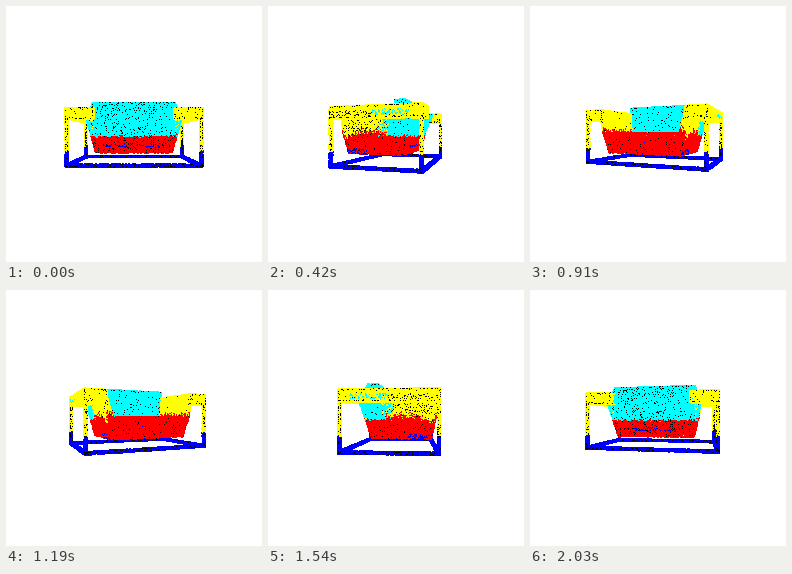
An HTML page with a canvas that plays this animation: 256 px wide and 256 px high, repeating every 2.1 s.

```html
<!DOCTYPE html>
<html>
<head>
<meta charset="utf-8">
<style>
html, body { margin: 0; height: 100%; overflow: hidden; background: #fff; }
canvas { display: block; width: 256px; height: 256px; }
</style>
</head>
<body>
<canvas id="stage" width="256" height="256"></canvas>
<script>
const SIZE = 256, MID = 128, STEP = 70, STEPS = 30;
const CAM = MID / Math.tan(Math.PI / 6);
// Packed as ABGR
const YELLOW = 0xff00ffff, CYAN = 0xffffff00, RED = 0xff0000ff,
  BLUE = 0xffff0000, BLACK = 0xff000000, WHITE = 0xffffffff;

let seed = 7;
const rnd = () => {
  seed = (Math.imul(seed, 1664525) + 1013904223) >>> 0;
  return seed / 4294967296;
};
const spread = n => (rnd() - 0.5) * n;
const dist = (a, b) => Math.hypot(a[0] - b[0], a[1] - b[1], a[2] - b[2]);
const points = [];

// Scatters points over the quad a-b-c-d; y points down, +z is the rear.
function quad(a, b, c, d, label, ink = 0.05) {
  const w = Math.max(dist(a, b), dist(d, c)), h = Math.max(dist(a, d), dist(b, c));
  for (let n = Math.ceil(w * h * 1.8); n > 0; n--) {
    const u = rnd(), v = rnd();
    const p = a.map((_, i) =>
      (a[i] * (1 - u) + b[i] * u) * (1 - v) + (d[i] * (1 - u) + c[i] * u) * v);
    const rim = Math.min(u * w, (1 - u) * w, v * h, (1 - v) * h) < 0.6;
    p.push(rnd() < (rim ? ink : 0.02) ? BLACK : label(...p));
    points.push(p);
  }
}

// Extrudes an x-z footprint from y0 down to y1.
function prism(foot, y0, y1, label, ink) {
  const at = (i, y) => [foot[i % 4][0], y, foot[i % 4][1]];
  for (let i = 0; i < 4; i++)
    quad(at(i, y0), at(i + 1, y0), at(i + 1, y1), at(i, y1), label, ink);
  for (const y of [y0, y1]) quad(at(0, y), at(1, y), at(2, y), at(3, y), label, ink);
}
const rect = (x0, x1, z0, z1) => [[x0, z0], [x1, z0], [x1, z1], [x0, z1]];

const blue = () => BLUE, cyan = () => CYAN;
const leg = (x, y) => y > 14 + spread(1.5) ? BLUE : YELLOW;

function arm(x, y, z) {
  x = Math.abs(x);
  if (x < 40.5 && y > -21.5 && y < -13.1) return z > 8 && z < 32 ? CYAN : YELLOW;
  if (x > 56.7 && Math.abs(y + 16.3) < 2) {
    if (z > 0 && z < 30 && rnd() < 0.45) return CYAN;
    if (z < 0 && rnd() < 0.16) return BLACK;
  }
  return YELLOW;
}
function side(x, y, z) {
  if (y > 13 && z < -14 && rnd() < 0.45) return BLUE;
  const rear = z > 2 + spread(12);
  const dome = -3 + 5 * ((z + 8) / 24) ** 2;
  if (y > (rear ? 1 + spread(2) : dome + spread(6))) return RED;
  return rear ? CYAN : rnd() < 0.08 ? BLACK : YELLOW;
}
function back(x, y) {
  x = Math.abs(x);
  if (rnd() < 0.03) return BLACK;
  if (x < 27 && Math.abs(y - 10.3) < 1.3 && rnd() < 0.4) return BLUE;
  if (y > 1.5 + spread(2)) return RED;
  return x > 37 && y > -20 && rnd() < 0.35 ? YELLOW : CYAN;
}
const front = (x, y) => y > -4 + spread(5) ? RED : YELLOW;

const BAR = 1.9, FLOOR = 27.3;
for (const s of [-1, 1]) {
  for (const z of [-38.4, 38.4 - BAR])
    prism(rect(s * 56.8, s * (56.8 - BAR), z, z + BAR), -13, FLOOR, leg, 0.25);
  prism(rect(s * 56.8, s * (56.8 - BAR), -38.4, 38.4), FLOOR - BAR, FLOOR, blue, 0.25);
  prism([[s * 56.8, -38.4], [s * 40, -38.4], [s * 34, 38.4], [s * 56.8, 38.4]],
    -21.8, -13, arm, 0.25);
  // Shell: outer wall, inner wall, front lip, and the end of the backrest
  quad([s * 41, -13, -37], [s * 42, -13, 26], [s * 35, 17.3, 17], [s * 35, 17.3, -33], side);
  quad([s * 40, -21.5, -37], [s * 37, -21.5, 10], [s * 34, 1, 7], [s * 35, 1, -36],
    (x, y) => y > -3 + spread(5) ? RED : YELLOW);
  quad([s * 41, -13, -37], [s * 38, -13, -37], [s * 34, 0, -36.5], [s * 39, 0, -36.5], front);
  quad([s * 37.3, -28.3, 11], [s * 37.3, -28.3, 20], [s * 42, -13, 26], [s * 37, -13, 9], cyan);
}
for (const z of [-38.4, 38.4 - BAR])
  prism(rect(-56.8, 56.8, z, z + BAR), FLOOR - BAR, FLOOR, blue, 0.25);

quad([-37.3, -28.3, 20], [37.3, -28.3, 20], [42, -13, 24], [-42, -13, 24], back);
quad([-42, -13, 24], [42, -13, 24], [35, 17.3, 17], [-35, 17.3, 17], back);
quad([-37.3, -28.3, 11], [37.3, -28.3, 11], [37.3, -28.3, 20], [-37.3, -28.3, 20], cyan, 0.4);
quad([-37.3, -28.3, 11], [37.3, -28.3, 11], [34, 1, 7], [-34, 1, 7], cyan);
quad([-39, -1, -36.5], [39, -1, -36.5], [34.5, 17.3, -33], [-34.5, 17.3, -33], front);

const ctx = document.getElementById('stage').getContext('2d');
const image = ctx.createImageData(SIZE, SIZE);
const pixels = new Uint32Array(image.data.buffer);
const depth = new Float32Array(SIZE * SIZE);

function draw(angle) {
  const c = Math.cos(angle), s = Math.sin(angle);
  pixels.fill(WHITE);
  depth.fill(-1e4);
  for (const [x, y, z, color] of points) {
    const near = z * c - x * s, k = CAM / (CAM - near);
    const dot = color === BLACK ? 1 : 2, lift = dot === 1 ? 0.6 : 0;
    const px = Math.floor(MID + (x * c + z * s) * k - (dot - 1) / 2);
    const py = Math.floor(MID + y * k - (dot - 1) / 2);
    for (let j = 0; j < dot; j++)
      for (let i = 0; i < dot; i++) {
        const at = (py + j) * SIZE + px + i;
        if (near + lift > depth[at]) {
          depth[at] = near + lift;
          pixels[at] = color;
        }
      }
  }
  ctx.putImageData(image, 0, 0);
}

const start = performance.now();
let shown = -1;
function tick() {
  const step = Math.floor((performance.now() - start) / STEP) % STEPS;
  if (step !== shown) draw((shown = step) / STEPS * 2 * Math.PI);
  requestAnimationFrame(tick);
}
tick();
</script>
</body>
</html>
```
